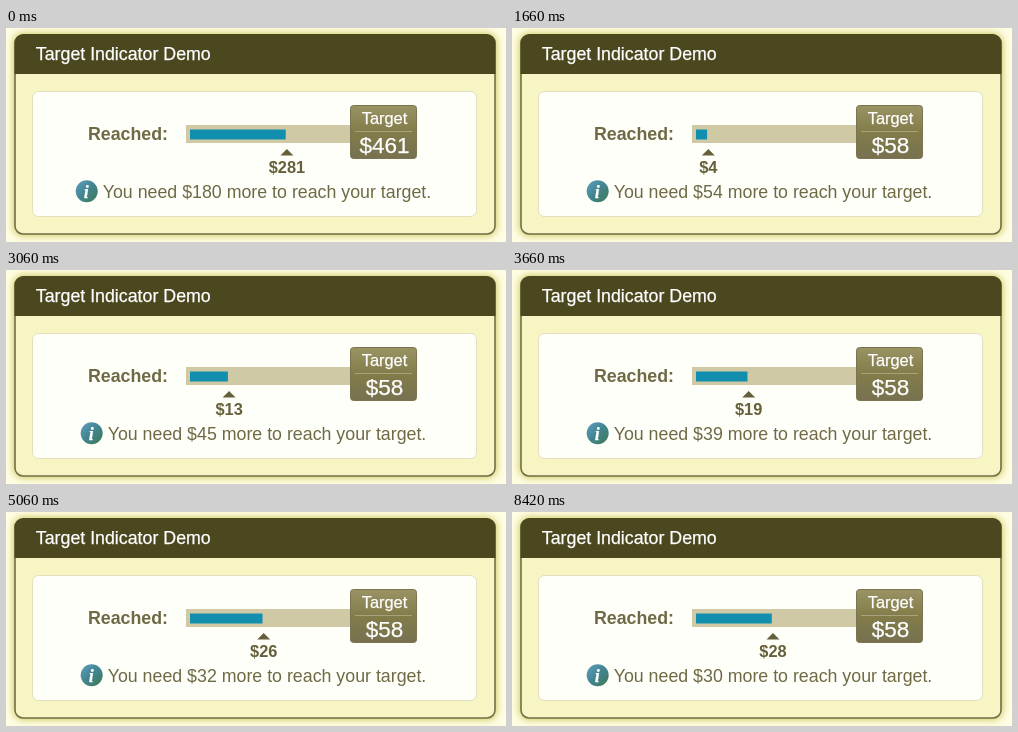
These frames come from a looping animation (500x214 px, 9.14 s). An HTML page:

```html
<!DOCTYPE html>
<html lang="en">
<head>
<meta charset="utf-8">
<title>Target Indicator Demo</title>
<style>
  html, body { margin: 0; width: 100%; height: 100%; overflow: hidden; background: #fffde2; }
  svg { display: block; width: 100%; height: 100%; }
  text { font: 17.8px Arial, "Liberation Sans", sans-serif; fill: #6f6a45; }
  .white { fill: #fff; stroke: #fff; stroke-width: .25; }
  .bold { font-weight: bold; }
  .mid { text-anchor: middle; }
  #label { font-size: 16.4px; fill: #66603a; }
  #caption { font-size: 16.4px; }
  #target { font-size: 22.5px; }
  #info { font: italic bold 18px "Liberation Serif", "Noto Serif", serif; }
</style>
</head>
<body>
<svg viewBox="0 0 500 214">
  <defs>
    <linearGradient id="badge" x2="0" y2="1">
      <stop stop-color="#9a9465"/><stop offset=".5" stop-color="#827c4a"/><stop offset="1" stop-color="#777150"/>
    </linearGradient>
    <linearGradient id="ball" x2="1" y2="1">
      <stop stop-color="#5f9fc0"/><stop offset=".5" stop-color="#418490"/><stop offset="1" stop-color="#3f7a50"/>
    </linearGradient>
    <filter id="blur"><feGaussianBlur stdDeviation="3.5"/></filter>
  </defs>

  <rect width="500" height="214" fill="#fffde2"/>
  <rect x="7" y="5" width="484" height="203" rx="10" fill="#cfca62" filter="url(#blur)"/>
  <rect x="9" y="7" width="480" height="199" rx="8" fill="#f7f5c4" stroke="#716e48" stroke-width="1.6"/>
  <path d="M8.5 46V15a9 9 0 0 1 9-9h463a9 9 0 0 1 9 9v31z" fill="#4b4820"/>
  <text class="white" x="29.8" y="32">Target Indicator Demo</text>
  <rect x="26.5" y="63.5" width="444" height="125" rx="6" fill="#fffffa" stroke="#e3dfbd"/>

  <text class="bold" x="82" y="112">Reached:</text>
  <rect x="180" y="97" width="166" height="18" fill="#cfcaa5"/>
  <rect id="bar" x="184" y="101.5" height="10" fill="#128fae"/>
  <g id="pointer">
    <path d="M-6.5 127.5L0 121l6.5 6.5z" fill="#66603a"/>
    <text id="label" class="bold mid" y="145.3"></text>
  </g>

  <rect x="344.5" y="77.5" width="66" height="53" rx="3" fill="url(#badge)" stroke="#7a7450"/>
  <path d="M349 103.5h57" stroke="#a8a27c"/>
  <text id="caption" class="white mid" x="378.5" y="96">Target</text>
  <text id="target" class="white mid" x="378.5" y="125"></text>

  <g id="icon">
    <circle cy="163.3" r="11" fill="url(#ball)"/>
    <text id="info" class="white mid" x="-.5" y="169.5">i</text>
  </g>
  <text id="message" class="mid" x="261" y="169.5"></text>
</svg>
<script>
  const LOOP = 9140, START = 260, STEPS = 120, FULL_WIDTH = 157;
  const el = id => document.getElementById(id);
  const setText = (id, text) => {
    if (el(id).textContent !== text) el(id).textContent = text;
  };

  // Three steps per 140 ms, held for 20, 20 and 100 ms.
  function stepAt(ms) {
    const rest = ms % 140;
    const step = 3 * Math.floor(ms / 140) + (rest < 20 ? 0 : rest < 40 ? 1 : 2);
    return Math.min(step, STEPS);
  }

  function show(reached, target) {
    const width = FULL_WIDTH * reached / target;
    const amount = Math.floor(reached);
    el('bar').setAttribute('width', width);
    el('pointer').setAttribute('transform', `translate(${185.2 + width})`);
    setText('label', `$${amount}`);
    setText('target', `$${target}`);
    setText('message', `You need $${target - amount} more to reach your target.`);
    const left = 261 - el('message').getComputedTextLength() / 2;
    el('icon').setAttribute('transform', `translate(${left - 16})`);
  }

  const origin = performance.now();
  function draw() {
    const t = (performance.now() - origin) % LOOP;
    if (t < START) {
      show(281, 461);
    } else {
      const progress = stepAt(t - START) / STEPS;
      show(28 * (0.5 - Math.cos(progress * Math.PI) / 2), 58);
    }
    requestAnimationFrame(draw);
  }
  draw();
</script>
</body>
</html>
```
